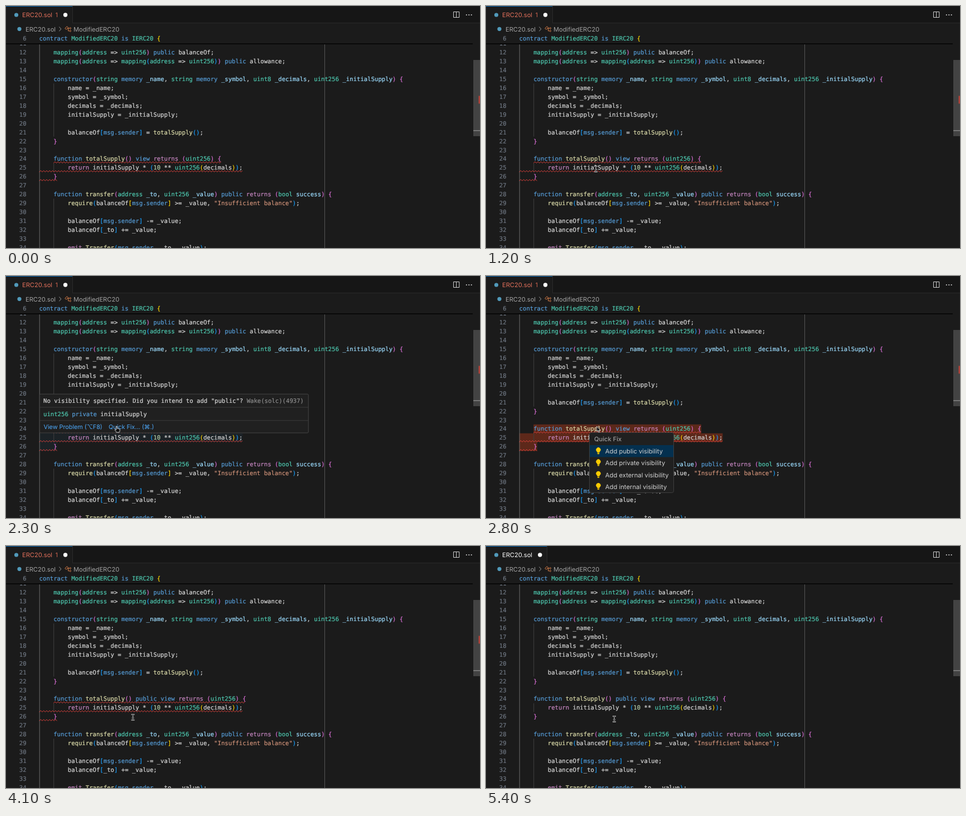
An HTML page for the animation above (5500 ms loop, 850 by 435 pixels).

```html
<!DOCTYPE html>
<html lang="en">
<head>
<meta charset="utf-8">
<title>Quick fix in the editor</title>
<style>
html, body { margin: 0; width: 100%; height: 100%; overflow: hidden; background: #1b1b1b; }
svg { display: block; width: 850px; height: 435px; }
text { text-rendering: geometricPrecision; white-space: pre; fill: currentColor; }
tspan { fill: currentColor; stroke: currentColor; }
.mono { font: 10.63px "DejaVu Sans Mono", monospace; color: #d8d8d8; stroke: currentColor; stroke-width: .2; }
.ui { font: 11.15px Inter, sans-serif; color: #d2d2d2; }
.num { color: #6e7681; text-anchor: end; }
.crumb { color: #a3a3a3; }
.link { font-size: 10.8px; color: #4daafc; }
.title { font-weight: 500; color: #9c9c9c; }
.wave { fill: none; stroke: #e5443f; stroke-width: .95; }

/* Hard cuts */
.tip, .menu, .pick, .pre, .post, .stale, .err, .ok, .beam, .arrow, .hand {
  animation: 5.5s step-end infinite;
}
.tip { animation-name: tip; }
.menu { animation-name: menu; }
.pick { animation-name: pick; }
.pre { animation-name: pre; }
.post { animation-name: post; }
.stale { animation-name: stale; }
.err { animation-name: err; }
.ok { animation-name: ok; }
.beam { animation-name: beam; }
.arrow { animation-name: pick-arrow; }
.hand { animation-name: hand; }
@keyframes tip { 0%, 43.6%, 100% { opacity: 0 } 23.6% { opacity: 1 } }
@keyframes menu { 0%, 70.9%, 100% { opacity: 0 } 43.6% { opacity: 1 } }
@keyframes pick { 0%, 58.1%, 100% { opacity: 0 } 43.6% { opacity: 1 } }
@keyframes pre { 0% { opacity: 1 } 70.9%, 100% { opacity: 0 } }
@keyframes post { 0% { opacity: 0 } 70.9%, 100% { opacity: 1 } }
@keyframes stale { 0%, 90.9%, 100% { opacity: 0 } 70.9% { opacity: 1 } }
@keyframes err { 0% { opacity: 1 } 90.9%, 100% { opacity: 0 } }
@keyframes ok { 0% { opacity: 0 } 90.9%, 100% { opacity: 1 } }
@keyframes beam { 0%, 36.3% { opacity: 0 } 3.6%, 70.9%, 100% { opacity: 1 } }
@keyframes pick-arrow { 0%, 61.8%, 100% { opacity: 0 } 43.6% { opacity: 1 } }
@keyframes hand { 0%, 43.6%, 70.9%, 100% { opacity: 0 } 36.3%, 61.8% { opacity: 1 } }

/* Pointer path */
.pointer { animation: move 5.5s ease-in-out infinite; }
@keyframes move {
  0%, 3.636% { transform: translate(258px, 442px) }
  12.727% { transform: translate(207px, 304.5px) }
  18.182%, 32.727% { transform: translate(197px, 293px) }
  40%, 52.727% { transform: translate(198.5px, 270px) }
  64.5%, 70.9% { transform: translate(225px, 304.5px) }
  78.182%, 100% { transform: translate(230px, 311px) }
}
</style>
</head>
<body>
<svg viewBox="0 0 850 435" xmlns="http://www.w3.org/2000/svg">
  <rect width="850" height="435" fill="#1b1b1b"/>

  <g id="marks"></g>
  <path id="guides" stroke="#404040" fill="none"/>
  <path d="M60.2 68V435" stroke="#6c6c6c"/>
  <path d="M571.5 68V435" stroke="#555"/>
  <g id="code"></g>

  <!-- Scrollbar -->
  <rect x="838" y="97" width="12" height="137" fill="#434343"/>
  <rect x="838" y="223" width="12" height="2" fill="#767676"/>
  <rect class="err" x="847.4" y="161.5" width="2.6" height="14" fill="#ad4139"/>

  <!-- Tabs, breadcrumb, sticky line -->
  <rect y="30" width="838" height="37" fill="#1b1b1b"/>
  <rect y="67" width="837" height="2" fill="#080808"/>
  <rect width="850" height="30" fill="#161616"/>
  <path d="M109 30.5H850" stroke="#2a2a2a"/>
  <g class="err">
    <rect width="119" height="31" fill="#1b1b1b"/>
    <path d="M119.5 0V31" stroke="#2a2a2a"/>
    <path d="M0 .5H119" stroke="#0a6cb8"/>
    <text class="ui" x="29" y="20" style="color:#e2705b">ERC20.sol</text>
    <text class="ui" x="88.5" y="20" style="color:#c9604e">1</text>
    <circle cx="106.5" cy="16" r="3.7" fill="#fff"/>
  </g>
  <g class="ok">
    <rect width="109" height="31" fill="#1b1b1b"/>
    <path d="M109.5 0V31" stroke="#2a2a2a"/>
    <path d="M0 .5H109" stroke="#0a6cb8"/>
    <text class="ui" x="29" y="20" style="color:#fff">ERC20.sol</text>
    <circle cx="96.8" cy="16" r="3.7" fill="#fff"/>
  </g>
  <circle cx="18.5" cy="16" r="3.6" fill="#519aba"/>
  <circle cx="24" cy="41.3" r="3.6" fill="#519aba"/>
  <text class="ui crumb" x="35" y="45.5">ERC20.sol</text>
  <path d="M95.2 37.6L99 41.4L95.2 45.2" fill="none" stroke="#a3a3a3"/>
  <g fill="none" stroke="#e0824a">
    <path d="M105.8 40.2L109.4 36.6L111.6 38.8L108 42.4ZM110.4 40H113.4M111.6 40V44.8H113.4"/>
    <path d="M113.6 40L115.2 38.4L116.8 40L115.2 41.6ZM113.6 44.8L115.2 43.2L116.8 44.8L115.2 46.4Z"/>
  </g>
  <text class="ui crumb" x="121" y="45.5">ModifiedERC20</text>
  <path d="M802.5 10.5H812.8V20.5H802.5ZM807.6 10.5V20.5" fill="none" stroke="#d0d0d0"/>
  <g fill="#d0d0d0">
    <circle cx="825.8" cy="16" r="1.1"/><circle cx="830.2" cy="16" r="1.1"/><circle cx="834.6" cy="16" r="1.1"/>
  </g>
  <g id="sticky"></g>

  <!-- Hover -->
  <g class="tip">
    <rect x="60.3" y="212.2" width="482" height="69.8" rx="2" fill="#202020" stroke="#454545"/>
    <path d="M61 236H542M61 259.8H542" stroke="#3a3a3a"/>
    <text class="mono" x="67" y="228">No visibility specified. Did you intend to add "public"? <tspan style="color:#8c8c8c">Wake(solc)(4937)</tspan></text>
    <g id="decl"></g>
    <text class="ui link" x="67.5" y="274.6">View Problem (⌥F8)</text>
    <text class="ui link" x="184" y="274.6">Quick Fix... (⌘.)</text>
  </g>

  <!-- Quick fix menu -->
  <g class="menu">
    <rect x="185.5" y="281.5" width="151" height="108" rx="3" fill="#202020" stroke="#3f3f3f"/>
    <text class="ui title" x="194" y="297">Quick Fix</text>
    <rect class="pick" x="186" y="304" width="150" height="21.5" fill="#04304f"/>
    <g id="items"></g>
  </g>

  <g class="pointer">
    <g class="beam" fill="none" stroke-linecap="round">
      <path d="M-2.2 -5Q0 -5 0 -3.4Q0 -5 2.2 -5M0 -3.4V3.4M-2.2 5Q0 5 0 3.4Q0 5 2.2 5M-1.2 1.4H1.2" stroke="#e0e0e0" stroke-width="1.8"/>
      <path d="M-2.2 -5Q0 -5 0 -3.4Q0 -5 2.2 -5M0 -3.4V3.4M-2.2 5Q0 5 0 3.4Q0 5 2.2 5M-1.2 1.4H1.2" stroke="#111" stroke-width=".8"/>
    </g>
    <path class="arrow" d="M0 0V9.6L2.2 7.6L3.7 11L5.2 10.3L3.8 7.1H6.8Z" fill="#0a0a0a" stroke="#f0f0f0" stroke-width=".9"/>
    <path class="hand" d="M-1 .8Q0 -.6 1 .8V4.2Q2.2 3.4 2.8 4.6Q4 4 4.4 5.2Q5.8 4.8 5.8 6.2Q5.8 9 4.6 11H-.4Q-1.2 9.2 -3 7.2Q-3.4 5.8 -2 6L-1 7Z" fill="#0a0a0a" stroke="#f0f0f0" stroke-width=".9"/>
  </g>
</svg>

<script>
const CH = 6.4, LEFT = 59.6, ROW = 15.93;
const $ = id => document.getElementById(id);
const midY = n => 83.5 + (n - 12) * ROW;
const colX = c => LEFT + c * CH;

const words = (color, list) => list.split(' ').map(w => [w, color]);
const palette = new Map([
  ...words('#569cd6', 'contract is constructor function public private view memory msg.sender'),
  ...words('#4ec9b0', 'ModifiedERC20 IERC20 mapping address uint256 uint8 string bool'),
  ...words('#c586c0', 'return returns emit')
]);
const brackets = ['#ffd700', '#da70d6', '#179fff'];

function highlight(line) {
  const indent = line.search(/\S/) / 4;
  const declares = /^\s*(function|constructor)/.test(line);
  let depth = indent + (line.trim() === '}');
  const color = (tok, next) => {
    if (palette.has(tok)) return palette.get(tok);
    if (/^[([{]$/.test(tok)) return brackets[depth++ % 3];
    if (/^[)\]}]$/.test(tok)) return brackets[--depth % 3];
    if (tok[0] === '"') return '#ce9178';
    if (/^\d/.test(tok)) return '#b5cea8';
    if (declares && /^(_|success)/.test(tok)) return '#9cdcfe';
    if (/^\w/.test(tok) && next === '(') return '#dcdcaa';
  };
  return line.replace(/"[^"]*"|msg\.sender|\w+|[^\w\s]/g, (tok, at) => {
    const c = color(tok, line[at + tok.length]);
    const safe = tok.replace('>', '&gt;');
    return c ? `<tspan style="color:${c}">${safe}</tspan>` : safe;
  });
}

const codeText = (line, x, y, cls = '') =>
  `<text class="mono ${cls}" x="${x}" y="${y}">${highlight(line)}</text>`;
const lineNo = (n, y) => `<text class="mono num" x="36.6" y="${y}">${n}</text>`;

const supply = mod => `    function totalSupply() ${mod}view returns (uint256) {`;
const source = `
    mapping(address => uint256) public balanceOf;
    mapping(address => mapping(address => uint256)) public allowance;

    constructor(string memory _name, string memory _symbol, uint8 _decimals, uint256 _initialSupply) {
        name = _name;
        symbol = _symbol;
        decimals = _decimals;
        initialSupply = _initialSupply;

        balanceOf[msg.sender] = totalSupply();
    }

${supply('')}
        return initialSupply * (10 ** uint256(decimals));
    }

    function transfer(address _to, uint256 _value) public returns (bool success) {
        require(balanceOf[msg.sender] >= _value, "Insufficient balance");

        balanceOf[msg.sender] -= _value;
        balanceOf[_to] += _value;

        emit Transfer(msg.sender, _to, _value);`.split('\n');

let code = '';
source.forEach((line, i) => {
  const n = 11 + i, y = midY(n) + 3.8;
  code += lineNo(n, y);
  if (line) code += codeText(line, LEFT, y, n === 24 ? 'pre' : '');
});
code += codeText(supply('public '), LEFT, midY(24) + 3.8, 'post');

// Error squiggles and highlighted ranges over the faulty function
const spans = end => [[24, colX(4), colX(end)], [25, colX(0), colX(57)], [26, colX(0), colX(5)]];

function wave([n, from, to]) {
  const y = midY(n) + 5.3, half = 2.66;
  let d = `M${from} ${y + 2.4}`;
  for (let x = from + half, k = 1; x <= to; x += half, k++) d += `L${x} ${y + (k % 2 ? 0 : 2.4)}`;
  return d;
}
const squiggle = (cls, end) => `<path class="wave ${cls}" d="${spans(end).map(wave).join('')}"/>`;
const block = ([n, from, to]) => `M${from} ${midY(n) - ROW / 2}H${to}v${ROW}H${from}Z`;
const shade = (cls, fill) => `<path class="${cls}" fill="${fill}" d="${spans(51).map(block).join('')}"/>`;

$('marks').innerHTML = shade('tip', '#1c2226') + shade('pick', '#5d281a');
$('code').innerHTML = code + squiggle('pre', 51) + squiggle('stale', 58);
$('guides').setAttribute('d', [[16, 21], [25, 25], [29, 34]].map(([a, b]) =>
  `M85.7 ${midY(a) - ROW / 2}V${midY(b) + ROW / 2}`).join(''));
$('sticky').innerHTML = lineNo(6, 62.3) + codeText('contract ModifiedERC20 is IERC20 {', LEFT, 62.3);
$('decl').innerHTML = codeText('uint256 private initialSupply', 67, 251.8);

$('items').innerHTML = ['public', 'private', 'external', 'internal'].map((name, i) => {
  const y = 315 + i * 21.3;
  return `<g transform="translate(201.5 ${y})">
      <path d="M-1.8 2.6Q-1.8 1.4 -3 .2A4.1 4.1 0 1 1 3 .2Q1.8 1.4 1.8 2.6ZM-1.8 3.3H1.8V4.2Q1.8 5.2 .8 5.2H-.8Q-1.8 5.2 -1.8 4.2Z" fill="#fc0"/>
    </g>
    <text class="ui" x="213.8" y="${y + 4}" style="font-size:11.25px">Add ${name} visibility</text>`;
}).join('');
</script>
</body>
</html>
```
